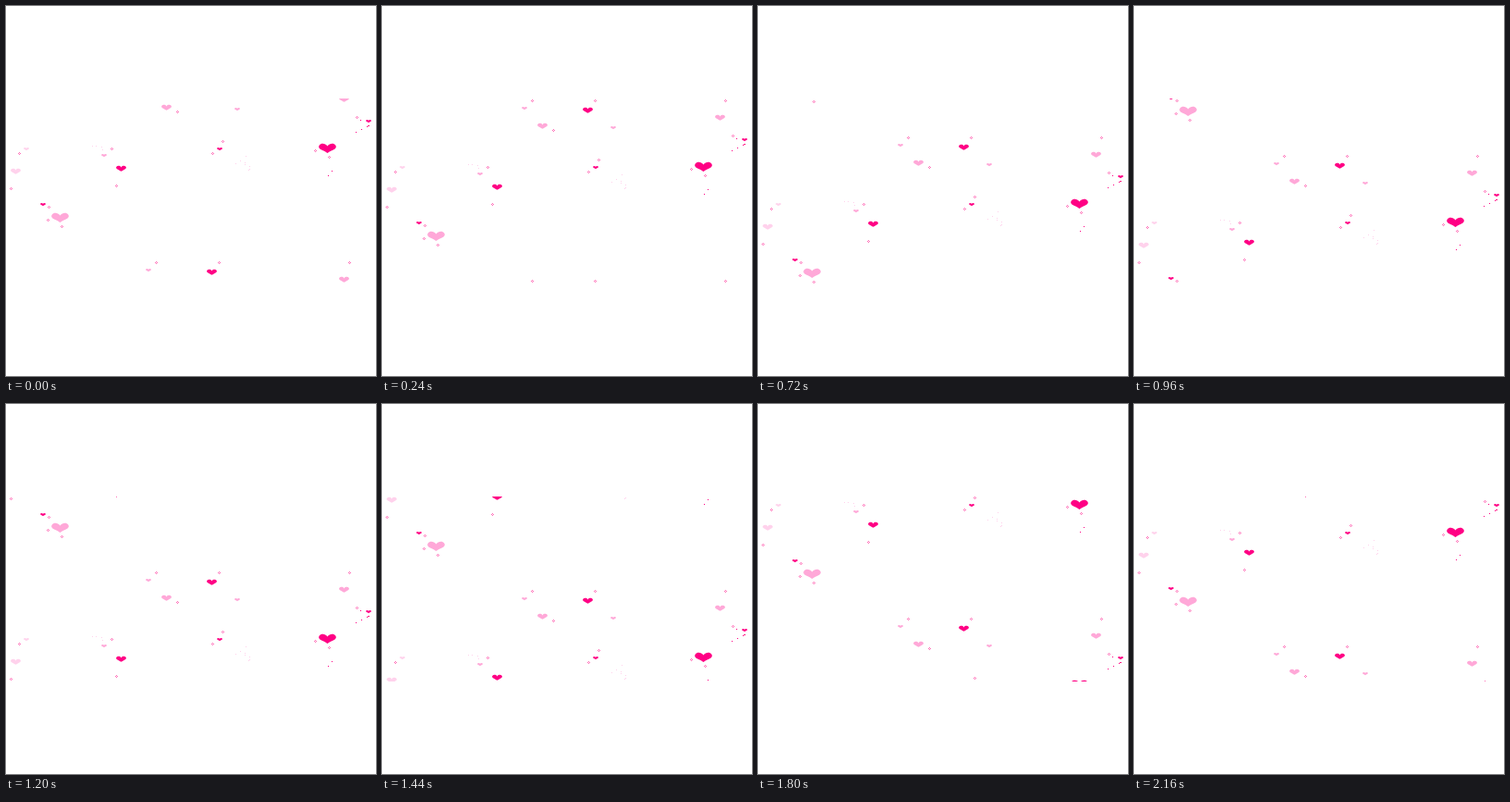
Recreate the animation shown at these times as an HTML page with a canvas. Size 400x400 px, loop 2.28 s.

```html
<!DOCTYPE html>
<html>
<head>
<meta charset="utf-8">
<style>
html, body { margin: 0; width: 100%; height: 100%; overflow: hidden; background: #fff; }
canvas { display: block; }
</style>
</head>
<body>
<canvas id="stage" width="400" height="400"></canvas>
<script>
const ctx = document.getElementById('stage').getContext('2d');
const HOT = '#ff0084', PINK = '#ffa8d8', PALE = '#ffd2ec', ROSE = '#ff70b8';
const BIG = 9.5, MID = 5.5, SMALL = 3;
const PERIOD = 195, TOP = 100, HEIGHT = 200, STEP = 10, DELAY = 120, STEPS = 19;

let seed = 7;
function random() {
  seed = seed * 16807 % 2147483647;
  return seed / 2147483647;
}

// Both halves share one path, so no seam shows along the axis
function heart(x, y, r, color) {
  ctx.fillStyle = color;
  ctx.beginPath();
  for (const side of [r, -r]) {
    const curve = (a, b, c, d, e, f) => ctx.bezierCurveTo(
      x + a * side, y + b * r, x + c * side, y + d * r, x + e * side, y + f * r);
    ctx.moveTo(x, y + .25 * r);
    curve(.25, -.1, .75, -.1, .92, .15);
    curve(1.12, .45, .8, .65, .5, .75);
    curve(.25, .85, .1, 1, 0, 1.05);
  }
  ctx.fill();
}

function ring(x, y) {
  ctx.fillRect(x, y - 1, 1, 1);
  ctx.fillRect(x, y + 1, 1, 1);
  ctx.fillRect(x - 1, y, 1, 1);
  ctx.fillRect(x + 1, y, 1, 1);
}

const hearts = [
  [347.5, 149, BIG, HOT], [58.5, 224, BIG, PINK],
  [124.5, 173, MID, HOT], [222.5, 285, MID, HOT],
  [173.5, 107, MID, PINK], [365.5, 293, MID, PINK], [10.5, 176, MID, PALE],
  [40, 213, SMALL, HOT], [231, 153, SMALL, HOT], [392, 123, SMALL, HOT],
  [154, 284, SMALL, PINK], [250, 110, SMALL, PINK], [106, 160, SMALL, PINK],
  [22, 153, SMALL, PALE]
];
const rings = [
  [162, 277], [230, 277], [371, 277], [185, 114], [14, 159], [5, 197], [46, 217], [45, 231],
  [60, 238], [119, 194], [114, 154], [234, 146], [223, 159], [334, 156], [349, 163], [379, 120]
];

function scatter(x, y, spread, count, color) {
  const offset = () => Math.round((random() * 2 - 1) * spread);
  return Array.from({ length: count }, () => [x + offset(), y + offset(), color]);
}
const specks = [
  ...scatter(387, 128, 9, 6, HOT), ...scatter(349, 181, 5, 2, HOT),
  ...scatter(255, 170, 9, 8, PALE), ...scatter(98, 154, 7, 4, PALE)
];

function tile(y) {
  ctx.save();
  ctx.translate(0, y);
  for (const h of hearts) heart(...h);
  ctx.fillStyle = ROSE;
  for (const p of rings) ring(...p);
  for (const [x, y, color] of specks) {
    ctx.fillStyle = color;
    ctx.fillRect(x, y, 1, 1);
  }
  ctx.restore();
}

function draw(now) {
  const shift = Math.floor(now / DELAY) % STEPS * STEP;
  ctx.clearRect(0, 0, 400, 400);
  ctx.save();
  ctx.beginPath();
  ctx.rect(0, TOP, 400, HEIGHT);
  ctx.clip();
  for (const k of [-1, 0, 1]) tile(shift + k * PERIOD);
  ctx.restore();
}

const start = performance.now();
function loop() {
  draw(performance.now() - start);
  requestAnimationFrame(loop);
}
loop();
</script>
</body>
</html>
```
